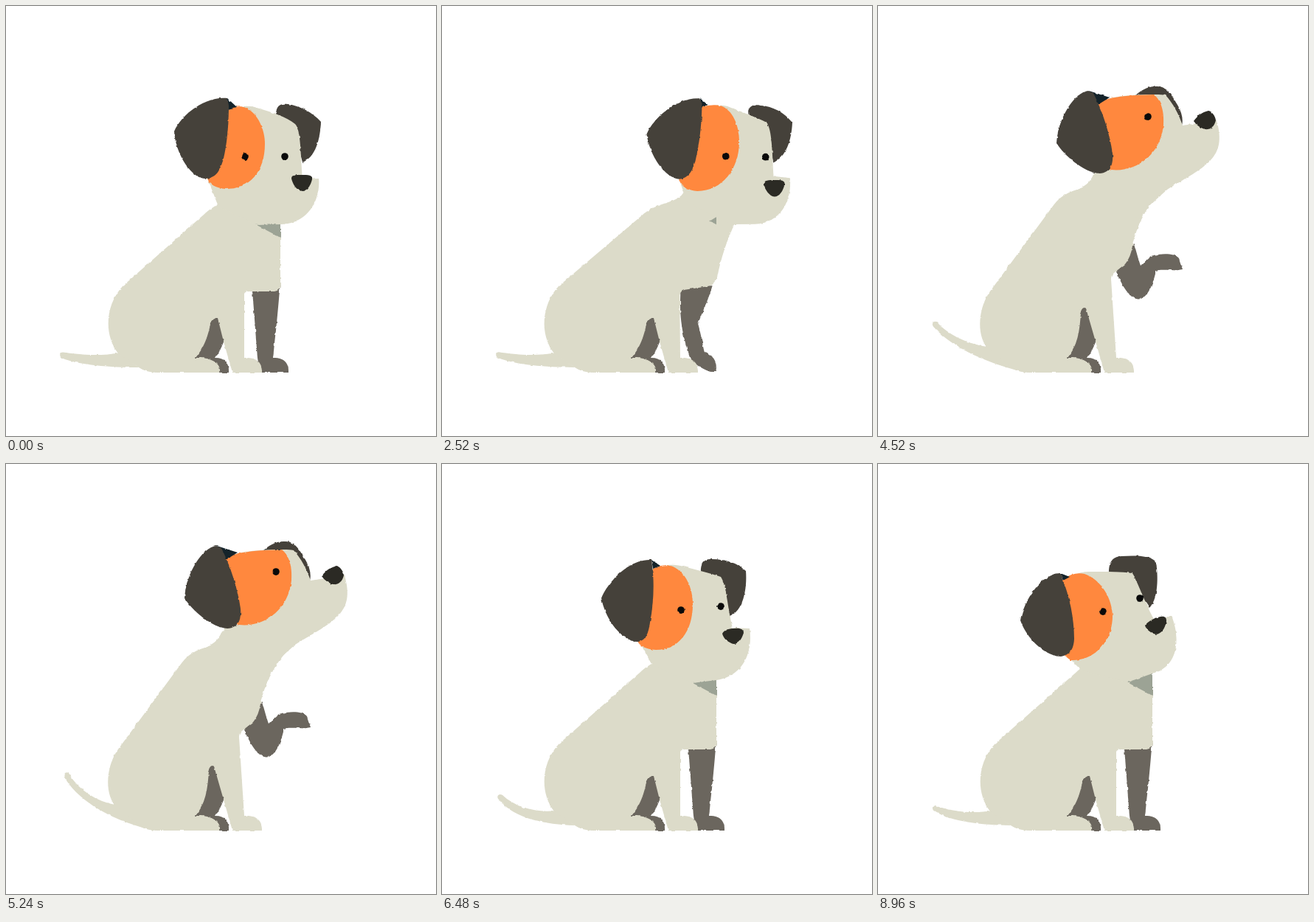
Animation, 583 px wide and 583 px high, one loop 9 s. Source, as an HTML page:

```html
<!DOCTYPE html>
<html lang="en">
<head>
<meta charset="utf-8">
<title>Dog</title>
<style>
  html, body { margin: 0; width: 100%; height: 100%; overflow: hidden; background: #fff; }
  svg { display: block; width: 100vw; height: 100vh; }
  .eye { fill: none; stroke: #0a0a0a; stroke-width: 9.6; stroke-linecap: round; }
</style>
</head>
<body>
<svg viewBox="0 0 583 583">
  <filter id="rough" filterUnits="userSpaceOnUse" x="0" y="0" width="583" height="583" color-interpolation-filters="sRGB">
    <feTurbulence type="fractalNoise" baseFrequency=".16" numOctaves="2" seed="4"/>
    <feDisplacementMap in="SourceGraphic" scale="2.8" xChannelSelector="R" yChannelSelector="G"/>
  </filter>
  <g filter="url(#rough)">
    <path id="farEar" fill="#45413a"/>
    <path id="farLeg" fill="#6b665e"/>
    <path fill="#6b665e" d="M274 405L282 400L287 420L296 453Q291 467 284 477C297 477 303 485 302 497L260 497L250 478Z"/>
    <path id="tail" fill="#dcdbc9"/>
    <path id="body" fill="#dcdbc9"/>
    <path id="shadow" fill="#9ca395"/>
    <path id="head" fill="#dcdbc9"/>
    <path id="patch" fill="#ff883e"/>
    <path id="innerEar" fill="#14232a"/>
    <path id="ear" fill="#45413a"/>
    <path id="eye" class="eye"/>
    <path id="farEye" class="eye"/>
    <path id="nose" fill="#2b2a24"/>
  </g>
</svg>
<script>
const LOOP = 9000, STEP = 40;

const heads = {
  level: {
    farEar: 'M367 152C364 138 370 131 382 133C400 136 415 144 427 157C426 180 420 205 402 212L390 165Z',
    head: 'M300 150C312 134 328 134 340 138C360 144 380 150 392 160C400 168 399 200 402 234L424 233C427 264 408 296 372 296L340 297L288 272L274 236Z',
    patch: 'M301 140C310 136 318 135 325 138C342 146 351 168 351 187C351 225 330 248 298 248C285 247 276 242 273 234Z',
    innerEar: 'M300 125L313 137L301 140Z',
    ear: 'M300 125C268 122 236 150 228 170C230 200 250 233 270 234C286 233 290 222 294 210C301 185 302 150 302 135Z',
    eye: 'M324 204L324 204.1',
    farEye: 'M378 204L378 204.1',
    nose: 'M387 234C387 229 392 229 400 229C410 229 416 229 415 235C413 244 408 251 401 251C394 250 389 242 387 234Z'
  },
  tilted: {
    farEar: 'M351 147C350 134 356 128 366 129C385 129 400 134 412 145C414 170 408 200 390 206L375 155Z',
    head: 'M285 145C300 134 318 136 328 139C345 144 365 148 378 153C386 165 387 195 394 222L417 223C422 255 408 288 372 293L339 297L285 273L266 238Z',
    patch: 'M286 142C295 137 305 136 313 139C331 147 340 169 340 190C340 228 320 252 290 252C276 251 268 247 265 240Z',
    innerEar: 'M284 130L296 138L286 142Z',
    ear: 'M284 130C255 128 226 158 216 182C222 212 244 240 265 241C277 240 280 228 282 215C287 190 288 160 285 138Z',
    eye: 'M324 198L324 198.1',
    farEye: 'M378 193L378 193.1',
    nose: 'M380 230C383 224 390 223 397 223C404 222 409 224 409 229C406 238 402 244 395 244C389 242 382 238 380 230Z'
  },
  back: {
    farEar: 'M313 148C313 132 318 126 330 125C350 124 370 124 377 133C381 160 378 185 368 195L345 160Z',
    head: 'M252 158C270 146 280 146 290 146C310 146 330 146 344 148C352 158 360 185 375 212L398 206C410 235 408 275 372 284L338 296L276 280L258 262Z',
    patch: 'M250 157C260 149 270 147 280 149C303 157 318 183 318 207C317 245 290 267 262 266C257 264 254 260 252 258Z',
    innerEar: 'M247 148L260 153L251 158Z',
    ear: 'M248 148C222 147 198 185 193 212C202 238 228 261 248 261C263 258 265 248 266 238C266 205 258 175 250 156Z',
    eye: 'M305 200L305 200.1',
    farEye: 'M355 182L355 182.1',
    nose: 'M362 219C367 212 375 209 383 207C389 206 391 208 391 213C389 224 384 230 377 231C370 229 364 225 362 219Z'
  },
  ahead: {
    farEar: 'M396 156C394 147 402 144 412 146C430 148 444 157 455 172C453 195 445 216 428 224L418 178Z',
    head: 'M330 152C345 142 360 141 370 146C388 154 408 162 420 169C427 178 427 210 427 243L449 246C451 275 436 306 400 306L366 305L306 272L300 246Z',
    patch: 'M332 145C340 143 350 142 358 143C374 148 383 168 383 192C383 228 358 260 324 260C312 259 303 255 299 243Z',
    innerEar: 'M331 133L341 142L332 146Z',
    ear: 'M330 133C300 131 266 158 257 180C260 208 280 240 300 242C313 240 319 230 323 218C330 190 333 160 334 140Z',
    eye: 'M364 215L364 215.1',
    farEye: 'M418 218L418 218.1',
    nose: 'M413 254C413 250 420 250 428 250C437 250 443 250 442 256C440 265 435 273 428 273C421 272 416 263 413 254Z'
  },
  up: {
    farEar: 'M345 119C352 113 362 106 375 107C388 107 395 120 402 132C408 142 410 152 408 160L385 125Z',
    head: 'M292 132C305 120 340 118 372 118C378 118 382 118 386 119C396 130 404 145 409 160L455 153C470 205 440 215 388 247L340 290L290 240L293 218Z',
    patch: 'M290 132C305 120 340 119 370 118C382 128 384 145 383 160C379 200 345 224 312 220C308 218 306 212 304 208Z',
    innerEar: 'M282 113L310 122L294 132Z',
    ear: 'M281 113C262 115 240 150 238 184C248 200 275 224 296 225C312 224 315 212 314 198C310 170 300 140 288 116Z',
    eye: 'M362 148L362 148.1',
    farEye: 'M402 144L402 144.1',
    nose: 'M424 154C429 147 435 142 444 140C449 141 453 147 454 153C452 162 446 166 439 165C433 163 428 160 424 154Z'
  }
};

const HIND = 'L180 490Q190 497 205 497L290 497C292 484 278 476 257 477';
const PAW = 'L295 455L307 497L347 497C348 482 338 476 323 477';
const SIT_HIP = 'L158 380C135 405 132 445 152 471' + HIND + 'C270 462 276 440 277 430Q282 422 287 423' + PAW;
const RISE_HIP = 'L154 384C135 408 134 445 147 462' + HIND + 'C270 462 274 440 275 414Q278 407 282 410' + PAW;

const restTail = {
  tailLow: 'M154 470C125 476 95 472 77 470C72 470 72 476 76 478C100 487 140 490 180 490Z',
  tailHigh: 'M154 470C130 473 100 466 82 448C77 445 73 450 77 454C100 482 140 488 180 490Z'
};
const bodies = {
  sit: {
    ...restTail,
    body: 'M288 268C282 273 276 275 268 283' + SIT_HIP + 'L323 390Q324 387 330 387L364 387Q372 386 372 378C372 350 372 320 372 290Z',
    shadow: 'M338 296L372 314L372 275Z'
  },
  lean: {
    ...restTail,
    body: 'M306 262C304 273 292 270 282 279' + SIT_HIP + 'L323 398Q324 392 330 392L362 391Q373 390 374 380C375 355 377 330 378 300Z',
    shadow: 'M364 304L378 312L378 300Z'
  },
  reach: {
    ...restTail,
    body: 'M344 240C340 268 300 258 270 286' + SIT_HIP + 'L322 392Q323 386 329 384L358 378Q370 374 374 362C380 342 390 318 408 292Z',
    shadow: 'M372 290L372 290L372 290Z'
  },
  rise: {
    tailLow: 'M148 462C125 460 95 462 66 452C61 451 60 457 64 459C95 475 150 485 200 497Z',
    tailHigh: 'M148 462C125 458 98 442 86 418C82 415 77 419 80 424C95 450 130 480 200 497Z',
    body: 'M293 226C282 256 258 243 238 270' + RISE_HIP + 'L316 370Q316 365 321 361L335 350Q343 340 345 325C350 300 365 268 388 247Z',
    shadow: 'M350 260L350 260L350 260Z'
  }
};

const legs = {
  stand: { farLeg: 'M334 375L372 372C370 400 367 430 366 440C364 455 363 470 362 477C378 476 384 486 383 497L346 497C343 490 342 484 341 477C339 450 336 410 334 387Z' },
  bent: { farLeg: 'M322 380L366 380C359 402 350 415 345 430C350 445 352 458 355 468C366 472 373 482 370 496L366 496C350 490 342 485 336 478C326 450 320 430 322 392Z' },
  pawHigh: { farLeg: 'M322 345L345 320C348 330 351 340 355 347C358 342 359 338 362 335C380 324 400 322 406 327L412 337C398 343 385 344 376 350C368 400 345 405 322 360Z' },
  pawLow: { farLeg: 'M323 345L347 322C350 332 353 344 356 352C361 347 365 343 370 339C385 335 402 335 408 342L413 357C400 360 385 356 377 359C366 408 344 412 323 360Z' }
};

// Tracks: [time, pose, dx, dy]
const headTrack = [
  [40, 'level', 0, 0], [1000, 'level', -1, 0], [1640, 'tilted', 0, 1],
  [1800, 'tilted', 0, 0], [2360, 'tilted', 0, 2], [2600, 'ahead', 42, -10],
  [2800, 'up', 4, 0], [2880, 'up', 6, -3], [3120, 'up', 0, 0],
  [3240, 'up', 0, 0], [4520, 'up', 4, 2], [5240, 'up', 4, -2],
  [5520, 'ahead', 33, -8], [5680, 'ahead', 0, 0], [6080, 'tilted', -2, 2],
  [6480, 'tilted', 0, 0], [7360, 'middle', -1, 4], [8240, 'back', 0, 0]
];
const bodyTrack = [
  [2360, 'sit'], [2600, 'reach'], [2800, 'rise'], [5240, 'rise'], [5520, 'reach'], [5680, 'lean'], [6080, 'sit']
];
const legTrack = [
  [2360, 'stand'], [2560, 'bent'], [2840, 'pawHigh'], [3240, 'pawHigh'], [4520, 'pawLow'],
  [5240, 'pawLow'], [5640, 'bent'], [5700, 'bent'], [6000, 'stand']
];

const NUMBER = /\d+(?:\.\d+)?/g;
const lerp = (a, b, k) => a + (b - a) * k;

function mixPath(a, b, k) {
  const ends = b.match(NUMBER);
  let i = 0;
  return a.replace(NUMBER, n => lerp(+n, +ends[i++], k).toFixed(2));
}

function mixPose(a, b, k) {
  const pose = {};
  for (const part in a) pose[part] = mixPath(a[part], b[part], k);
  return pose;
}

heads.middle = mixPose(heads.tilted, heads.back, .5);

function sample(track, poses, t) {
  let i = track.findIndex(key => key[0] > t);
  if (i < 0) i = track.length;
  const a = track[Math.max(i - 1, 0)], b = track[Math.min(i, track.length - 1)];
  const x = a === b ? 0 : (t - a[0]) / (b[0] - a[0]);
  const k = x * x * (3 - 2 * x);
  return {
    pose: mixPose(poses[a[1]], poses[b[1]], k),
    shift: a.slice(2).map((v, j) => lerp(v, b[j + 2], k)),
    upness: lerp(+(a[1] === 'up'), +(b[1] === 'up'), k)
  };
}

const node = id => document.getElementById(id);

function wagAt(t) {
  const early = t < 1920;
  const wave = (1 - Math.cos(2 * Math.PI * (t - (early ? 20 : 260)) / 320)) / 2;
  return wave * (early ? .6 : 1);
}

function draw(t) {
  const head = sample(headTrack, heads, t);
  const [dx, dy] = head.shift;
  for (const part in head.pose) {
    node(part).setAttribute('d', head.pose[part]);
    node(part).setAttribute('transform', `translate(${dx} ${dy})`);
  }
  node('farEye').style.opacity = head.upness > .5 ? 0 : 1;

  const { body, shadow, tailLow, tailHigh } = sample(bodyTrack, bodies, t).pose;
  node('body').setAttribute('d', body);
  node('shadow').setAttribute('d', shadow);
  node('tail').setAttribute('d', mixPath(tailLow, tailHigh, wagAt(t)));
  node('farLeg').setAttribute('d', sample(legTrack, legs, t).pose.farLeg);
}

let shown = -1;
function tick() {
  const t = Math.floor(performance.now() % LOOP / STEP) * STEP;
  if (t !== shown) draw(shown = t);
  requestAnimationFrame(tick);
}
tick();
</script>
</body>
</html>
```
